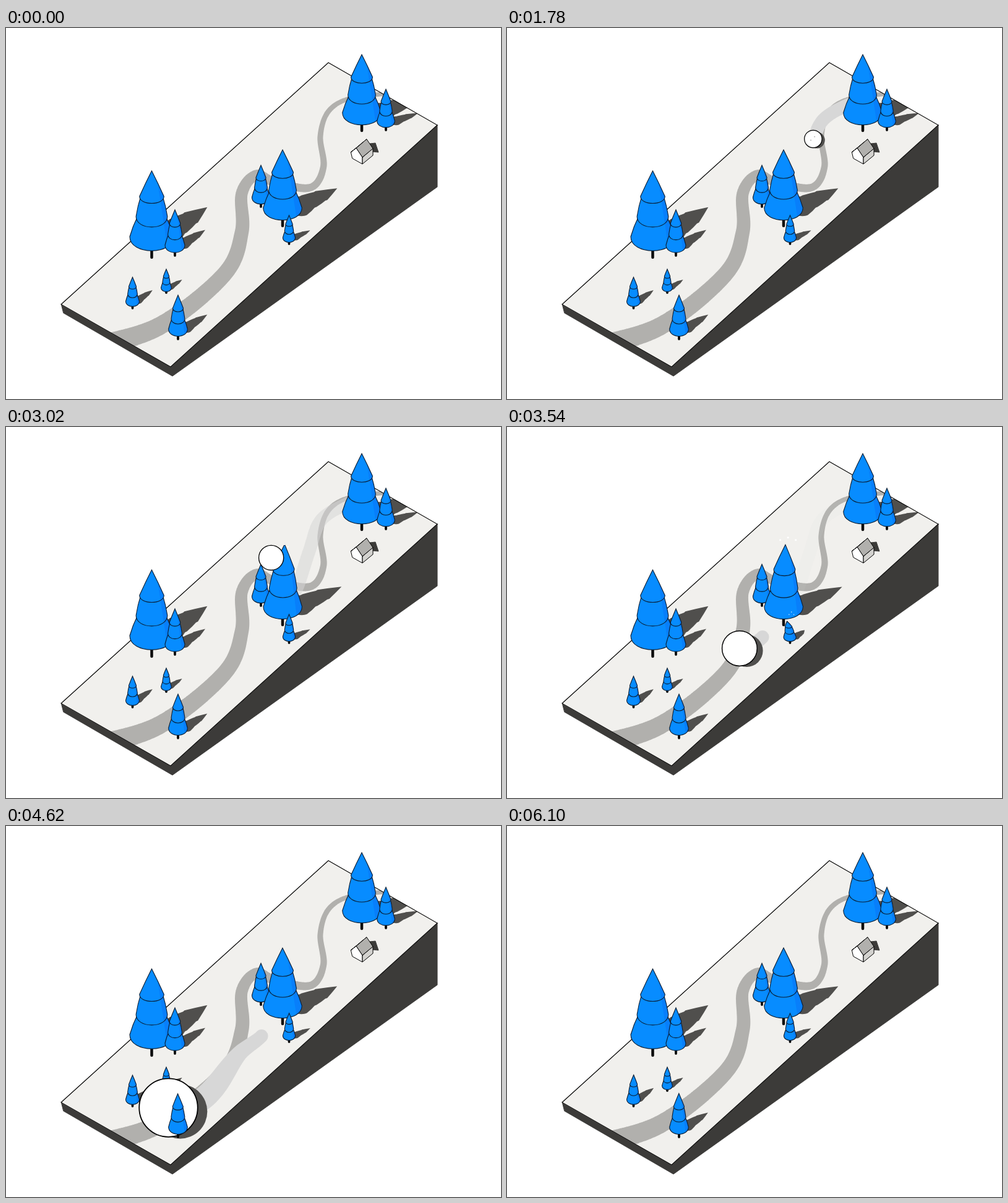
An HTML page with a canvas that plays this animation: 800 px wide and 600 px high, repeating every 6.14 s.

```html
<!DOCTYPE html>
<html lang="en">
<head>
<meta charset="utf-8">
<title>Snowball</title>
<style>
  html, body { margin: 0; width: 100%; height: 100%; overflow: hidden; background: #fff; }
  canvas { display: block; }
</style>
</head>
<body>
<canvas id="stage" width="800" height="600"></canvas>
<script>
const ctx = document.getElementById('stage').getContext('2d');
const LOOP = 6140, HOP_START = 2480, HOP_END = 3240;
const SHADOW = '#504f4d', DARK = '#3c3b39', ROAD = '#b1b0ad';
const TOP = [[521, 56], [697, 157], [266, 548], [89, 447]];

// Key points of the road, top to bottom
const road = [
  [615, 106], [555, 114], [521, 135], [508, 175], [513, 225], [492, 258], [436, 250],
  [404, 238], [381, 268], [381, 330], [353, 398], [250, 481], [140, 517]
].map((p, i) => [i, ...p]);

// Ball on the ground: time, x, y
const roll = [
  [500, 603, 104], [1140, 544, 123], [1500, 508, 147], [1900, 490, 195], [2380, 466, 262],
  [HOP_END, 413, 331], [3540, 376, 358], [4180, 318, 423], [5100, 200, 487], [5500, 158, 511]
];

// x, foot y, height and, where the ball strikes, the moment
const trees = [
  [575, 168, 125], [614, 167, 68], [412, 291, 69], [447, 322, 125, 2900], [457.5, 351, 48, 3480],
  [235.5, 373, 142], [273, 370, 76], [259, 430, 40], [204.5, 455, 52, 4980], [278, 505, 73, 4800]
].map(([x, base, h, hit]) => ({ x, base, h, hit, w: h * (h > 100 ? .25 : .21) }));

// Lowest tier first; each one starts at the rim of the tier above
const rim = i => [1 / (1 + .4 * i), .75 - .23 * i];
const tiers = [0, 1, 2].map(i => ({
  edge: rim(i),
  shoulder: i < 2 ? [.9 * rim(i + 1)[0], rim(i + 1)[1]] : [0, 0],
  belly: .16 - .04 * i
}));

const clamp = u => Math.min(1, Math.max(0, u));

function polygon(points) {
  ctx.beginPath();
  points.forEach(p => ctx.lineTo(...p));
  ctx.closePath();
}

function shape(points, fill, stroke = fill) {
  polygon(points);
  ctx.fillStyle = fill;
  ctx.fill();
  ctx.strokeStyle = stroke;
  ctx.lineWidth = 1;
  ctx.stroke();
}

function disc(x, y, r, fill) {
  ctx.beginPath();
  ctx.arc(x, y, r, 0, 7);
  ctx.fillStyle = fill;
  ctx.fill();
}

function hermite(a, b, ma, mb, u) {
  const v = 1 - u;
  return v * v * ((1 + 2 * u) * a + u * ma) + u * u * ((3 - 2 * u) * b - v * mb);
}

// Smooth curve through rows of [position, x, y]
function sample(rows, s) {
  let i = 0;
  while (i < rows.length - 2 && s > rows[i + 1][0]) i++;
  const a = rows[i], b = rows[i + 1], span = b[0] - a[0];
  const before = rows[i - 1] || a, after = rows[i + 2] || b;
  const u = clamp((s - a[0]) / span);
  return [1, 2].map(k => hermite(a[k], b[k],
    (b[k] - before[k]) / (b[0] - before[0]) * span,
    (after[k] - a[k]) / (after[0] - a[0]) * span, u));
}

function band(from, to, step, at, fill) {
  ctx.beginPath();
  for (let s = from; s <= to; s += step) {
    const [x, y, r] = at(s);
    ctx.moveTo(x + r, y);
    ctx.arc(x, y, r, 0, 2 * Math.PI);
  }
  ctx.fillStyle = fill;
  ctx.fill();
}

function drawRoad() {
  const last = road.length - 1;
  band(0, last, .03, s => [...sample(road, s), 3.5 + 13 * (s / last) ** 1.8], ROAD);
}

// Steady growth with a quick swell in the middle of the run
function radius(t) {
  const grown = 6 + .0046 * t + 20 / (1 + Math.exp((3650 - t) / 130));
  return grown * clamp((t - 500) / 300) * clamp((5700 - t) / 300);
}

function ballAt(t) {
  const [x, ground] = sample(roll, t), r = radius(t);
  const u = clamp((t - HOP_START) / (HOP_END - HOP_START));
  const lift = 500 * u * (1 - u);
  return { x, y: ground - lift, r, lift, depth: ground + r };
}

function trail(t, from, end, fadeStart, fadeEnd, width) {
  if (t < from || t > fadeEnd) return;
  ctx.globalAlpha = clamp((fadeEnd - t) / (fadeEnd - fadeStart));
  band(from, Math.min(t, end), 8, s => {
    const [x, y] = sample(roll, s), r = radius(s);
    return [x, y + .4 * r, width(r)];
  }, '#d7d7d7');
  ctx.globalAlpha = 1;
}

// Damped swing after a hit, with a short run-up
function swing({ hit }, t) {
  if (!hit) return 0;
  const d = t - hit;
  return d < 0 ? Math.exp(d / 50) : Math.exp(-d / 300) * Math.cos(d * 2 * Math.PI / 430);
}

// Tree space (x -1 to 1, y 0 at the top to 1 at the foot) to pixels right of and above the foot
function bent(tree, t) {
  const k = swing(tree, t) * tree.h;
  return (x, y) => {
    const up = 1 - y;
    return [x * tree.w - .2 * k * up * up, up * tree.h - .45 * k * up * up];
  };
}

function tierPath({ shoulder: [sx, sy], edge: [ex, ey], belly }, map) {
  const cx = (sx + ex) / 2 * 1.06, cy = (sy + ey) / 2, low = ey + belly * 4 / 3;
  ctx.beginPath();
  ctx.moveTo(...map(-sx, sy));
  ctx.quadraticCurveTo(...map(-cx, cy), ...map(-ex, ey));
  ctx.bezierCurveTo(...map(-ex, low), ...map(ex, low), ...map(ex, ey));
  ctx.quadraticCurveTo(...map(cx, cy), ...map(sx, sy));
  ctx.closePath();
}

function treeShadow(tree, t) {
  const bend = bent(tree, t);
  const alongX = .55 + .00035 * tree.x, alongY = .5 - .0004 * tree.x;
  const map = (x, y) => {
    const [px, up] = bend(x, y);
    return [tree.x + px * .55 + up * alongX, tree.base - .18 * tree.h + px * .42 - up * alongY];
  };
  ctx.fillStyle = SHADOW;
  for (const tier of tiers) {
    tierPath(tier, map);
    ctx.fill();
  }
}

function drawTree(tree, t) {
  const bend = bent(tree, t);
  const map = (x, y) => {
    const [px, up] = bend(x, y);
    return [tree.x + px, tree.base - up];
  };
  ctx.lineCap = 'round';
  ctx.strokeStyle = '#0b0b0b';
  ctx.lineWidth = tree.h > 100 ? 4.5 : 3.8;
  ctx.beginPath();
  ctx.moveTo(tree.x, tree.base - .15 * tree.h);
  ctx.lineTo(tree.x, tree.base - 2);
  ctx.stroke();
  for (const tier of tiers) {
    tierPath(tier, map);
    ctx.fillStyle = '#078cff';
    ctx.fill();
    ctx.save();
    ctx.clip();
    shape([map(.2, 0), map(.78, .95), map(1.3, .95), map(1.3, 0)], '#087ffb');
    ctx.restore();
    tierPath(tier, map);
    ctx.strokeStyle = '#0a1c30';
    ctx.lineWidth = 1.1;
    ctx.stroke();
  }
  drawFlakes(tree, t);
}

function drawFlakes({ x, base, h, hit }, t) {
  const u = (t - hit) / 800;
  if (!(u > 0 && u < 1)) return;
  for (const i of [-1, 0, 1]) {
    disc(x + (14 * i + 8) * Math.sqrt(u), base - h - 38 * u * (1.4 - u) + 4 * i * i, 10 * u * (1 - u), '#fff');
  }
}

function drawHouse() {
  const back = ([x, y]) => [x + 17, y - 14];
  const extrude = (a, b, fill) => shape([a, b, back(b), back(a)], fill, '#000');
  const eave = [557, 201], ridge = [566, 194], corner = [576, 209], foot = [576, 220];
  shape([[588, 187], [597, 186], [602, 201], [592, 200]], DARK);
  shape([eave, ridge, corner, foot, [560, 211]], '#fff', '#000');
  extrude(corner, foot, '#d3d2cf');
  extrude(eave, ridge, '#fff');
  extrude(ridge, corner, ROAD);
}

function drawBall({ x, y, r }, t) {
  if (r < .3) return;
  disc(x, y, r, '#fff');
  ctx.strokeStyle = '#000';
  ctx.lineWidth = 1 + r / 60;
  ctx.stroke();
  if (r > 18) return;
  for (const turn of [0, 2.6]) {
    const a = turn - t / 180;
    disc(x + Math.cos(a) * r * .3, y + Math.sin(a) * r * .3, .9, '#aaa');
  }
}

function draw(t) {
  const ball = ballAt(t);
  ctx.fillStyle = '#fff';
  ctx.fillRect(0, 0, 800, 600);
  shape([TOP[1], [697, 257], [269, 563], TOP[2]], DARK);
  shape([TOP[3], TOP[2], [269, 563], [93, 461]], DARK);
  shape(TOP, '#f1f0ed');

  ctx.save();
  polygon(TOP);
  ctx.clip();
  drawRoad();
  trail(t, 1000, HOP_START, HOP_START, 3650, () => 10.5);
  trail(t, HOP_END, 5400, 4750, 5550, r => .35 * r + 3);
  trees.forEach(tree => treeShadow(tree, t));
  if (!ball.lift) disc(ball.x + .4 * ball.r, ball.y + .13 * ball.r, .93 * ball.r, SHADOW);
  ctx.restore();

  polygon(TOP);
  ctx.strokeStyle = '#000';
  ctx.lineWidth = 1.1;
  ctx.stroke();

  const behind = tree => tree.base < ball.depth;
  drawHouse();
  trees.filter(behind).forEach(tree => drawTree(tree, t));
  drawBall(ball, t);
  trees.filter(tree => !behind(tree)).forEach(tree => drawTree(tree, t));
}

const begin = performance.now();
function frame() {
  draw((performance.now() - begin) % LOOP);
  requestAnimationFrame(frame);
}
frame();
</script>
</body>
</html>
```
